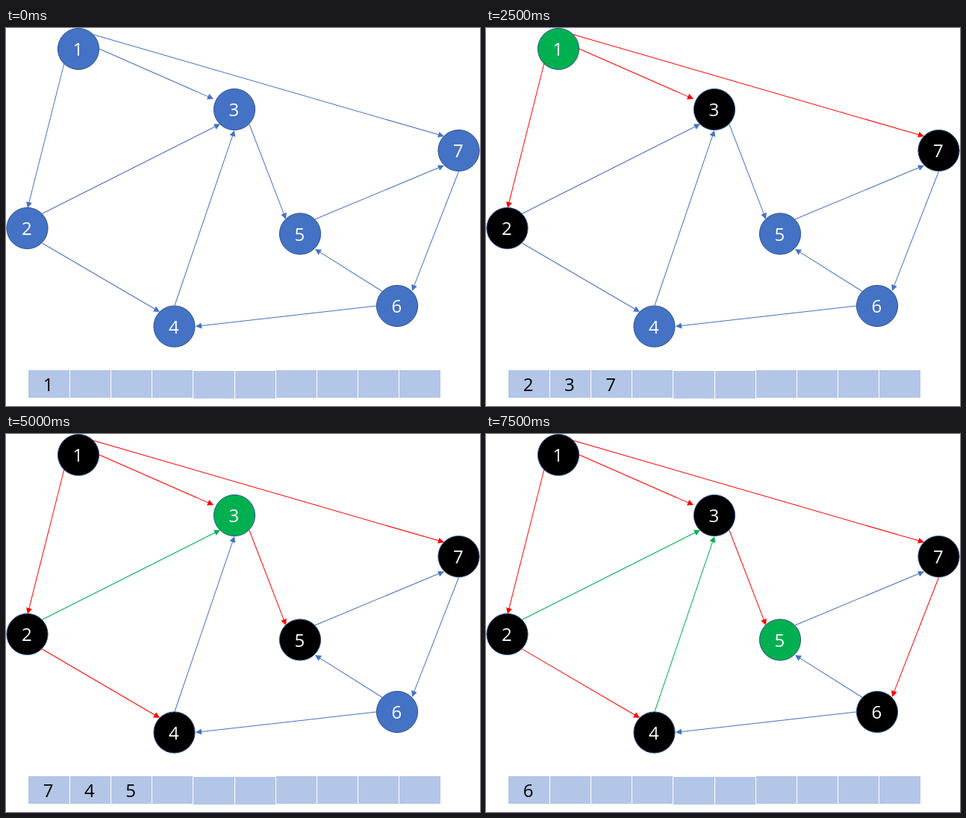
Recreate the animation shown at these times as an HTML page. Size 635 by 506 pixels, loop 8000 ms.

```html
<!DOCTYPE html>
<html lang="en">
<head>
<meta charset="utf-8">
<title>Breadth-first search</title>
<style>
  html, body { margin: 0; width: 100%; height: 100%; overflow: hidden; background: #fff; }
  svg { display: block; width: 635px; height: 506px; }
  text { font: 24px "Open Sans", "Noto Sans", sans-serif; text-anchor: middle; }
</style>
</head>
<body>
<svg id="stage" viewBox="0 0 635 506"></svg>
<script>
const BLUE = '#4472c4', GREEN = '#00b050', RED = '#ff0000', BLACK = '#000000';
const STEP = 500;

const nodes = {
  1: [97, 28], 2: [28.5, 268], 3: [306, 109], 4: [225.5, 399.5],
  5: [394, 275.5], 6: [524, 372], 7: [606.5, 164]
};
const edges = {
  '1-2': [78, 47, 29, 241],
  '1-3': [124, 27.5, 278, 95],
  '1-7': [116, 8.5, 587, 145],
  '2-3': [48.5, 248.5, 287, 128.5],
  '2-4': [48.5, 288, 206, 380],
  '3-5': [326, 129, 375, 256],
  '4-3': [226, 371.5, 306, 137],
  '5-7': [414, 256, 587, 184],
  '7-6': [606.5, 192, 544, 352],
  '6-5': [504, 352.5, 414, 296],
  '6-4': [496, 372, 254, 399.5]
};

// Each action edits the search state; one action happens per step.
const mark = id => s => { s.node[id] = BLACK; };
const take = id => s => {
  if (s.current) s.node[s.current] = BLACK;
  s.current = id;
  s.node[id] = GREEN;
  s.queue.shift();
};
const discover = id => s => {
  s.edge[s.current + '-' + id] = RED;
  s.node[id] = BLACK;
  s.queue.push(id);
};
const skip = id => s => { s.edge[s.current + '-' + id] = GREEN; };

const actions = [
  mark(1), take(1), discover(2), discover(3), discover(7),
  take(2), skip(3), discover(4),
  take(3), discover(5),
  take(7), discover(6),
  take(4), skip(3),
  take(5)
];
const LOOP = (actions.length + 1) * STEP;

const stage = document.getElementById('stage');
function add(tag, attrs, parent = stage) {
  const el = document.createElementNS('http://www.w3.org/2000/svg', tag);
  for (const key in attrs) el.setAttribute(key, attrs[key]);
  return parent.appendChild(el);
}

const circles = {}, arrows = {}, slots = [];

for (const id in nodes) {
  const [x, y] = nodes[id];
  circles[id] = add('circle', { cx: x, cy: y, r: 27.6, stroke: '#2f528f' });
  add('text', { x: x - 0.7, y: y + 9, fill: '#fff' }).textContent = id;
}

for (const id in edges) {
  const [x1, y1, x2, y2] = edges[id];
  const length = Math.hypot(x2 - x1, y2 - y1);
  const angle = Math.atan2(y2 - y1, x2 - x1) * 180 / Math.PI;
  const g = arrows[id] = add('g', { transform: `translate(${x2} ${y2}) rotate(${angle})` });
  add('path', { d: `M${-length} 0H-6`, 'stroke-width': 1 }, g);
  add('path', { d: 'M0 0L-8 -4V4Z', stroke: 'none' }, g);
}

const slotEdge = i => Math.floor(30 + 55.2 * i);
for (let i = 0; i < 10; i++) {
  const left = slotEdge(i) + (i ? 1 : 0);
  const top = i === 4 || i === 5 ? 459 : 458;
  add('rect', { x: left, y: top, width: slotEdge(i + 1) - left, height: 37, fill: '#b4c6e7' });
  slots.push(add('text', { x: 56.6 + 55.2 * i, y: 486, fill: BLACK }));
}

function stateAt(step) {
  const state = { node: {}, edge: {}, queue: [1], current: 0 };
  actions.slice(0, step).forEach(act => act(state));
  return state;
}

let shown = -1;
function render(time) {
  const step = Math.floor(time % LOOP / STEP);
  if (step === shown) return;
  shown = step;
  const state = stateAt(step);
  for (const id in circles) circles[id].setAttribute('fill', state.node[id] || BLUE);
  for (const id in arrows) {
    const color = state.edge[id] || BLUE;
    arrows[id].setAttribute('fill', color);
    arrows[id].setAttribute('stroke', color);
  }
  slots.forEach((slot, i) => { slot.textContent = state.queue[i] || ''; });
}

const start = performance.now();
function tick() {
  render(performance.now() - start);
  requestAnimationFrame(tick);
}
tick();
</script>
</body>
</html>
```
